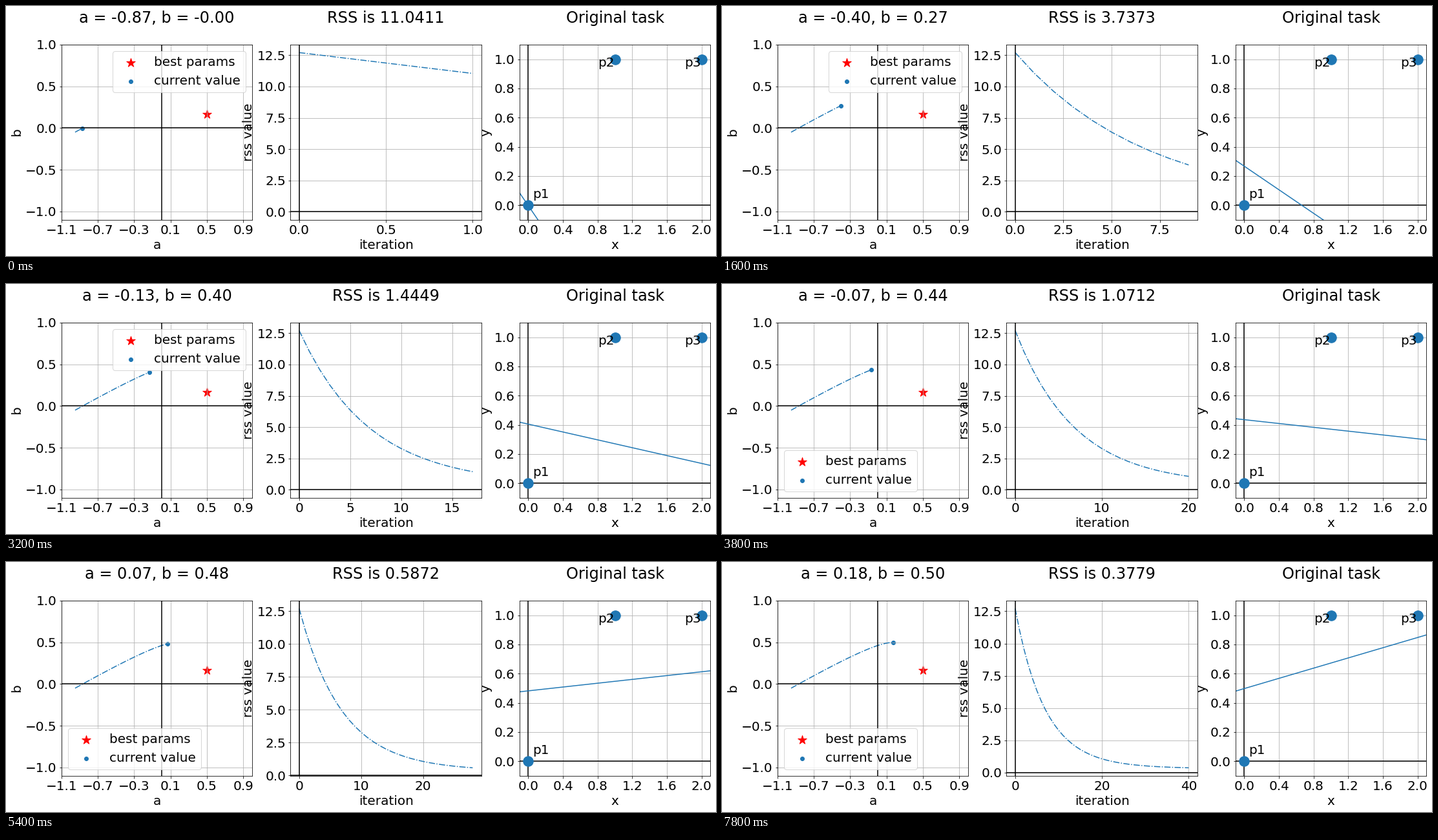
Write a matplotlib script that moves like this. It is 1099 px wide and 388 px high and loops after 8 s.

```python
import numpy as np
import matplotlib.pyplot as plt
from matplotlib.animation import FuncAnimation

W, H, DPI = 1099, 388, 72
STEPS, RATE = 40, 0.005
BLUE = "#1f77b4"

plt.rcParams["font.family"] = "DejaVu Sans"
plt.rcParams["font.size"] = 20

xs = np.array([0.0, 1.0, 2.0])
ys = np.array([0.0, 1.0, 1.0])


def rss(a, b):
    return np.sum((a * xs + b - ys) ** 2)


def descend(a, b, steps):
    """Gradient descent that updates a first, then b with the new a."""
    path = [(a, b)]
    for _ in range(steps):
        a -= RATE * 2 * np.sum((a * xs + b - ys) * xs)
        b -= RATE * 2 * np.sum(a * xs + b - ys)
        path.append((a, b))
    return np.array(path)


path = descend(-0.95, -0.05, STEPS)
losses = np.array([rss(a, b) for a, b in path])

fig = plt.figure(figsize=(W / DPI, H / DPI), dpi=DPI)


def add_axes(col):
    left, width, height = 85.88 + col * 354.494, 295.412, 271.8
    return fig.add_axes([left / W, 56.25 / H, width / W, height / H])


def zero_lines(ax):
    ax.axhline(0, color="black")
    ax.axvline(0, color="black")


def label(ax, x, y):
    ax.set_xlabel(x)
    ax.set_ylabel(y)
    ax.grid(True)


ax_par, ax_loss, ax_fit = (add_axes(i) for i in range(3))

# parameter plane
ax_par.scatter([0.5], [1 / 6], s=200, marker="*", color="red", label="best params")
dot = ax_par.scatter([0], [0], color=BLUE, label="current value")
trail, = ax_par.plot([], [], "-.", color=BLUE)
zero_lines(ax_par)
ax_par.set(xlim=(-1.1, 1), ylim=(-1.1, 1),
           xticks=np.arange(-1.1, 1, 0.4), yticks=np.arange(-1, 1.1, 0.5))
label(ax_par, "a", "b")
ax_par.legend(loc="best")

# points and fitted line
ax_fit.scatter(xs, ys, s=240, color=BLUE, zorder=2.5)
for name, x, y in (("p1", 0.05, 0.05), ("p2", 0.8, 0.95), ("p3", 1.8, 0.95)):
    ax_fit.text(x, y, name)
zero_lines(ax_fit)
ends = np.array([-0.1, 2.1])
fit, = ax_fit.plot([], [], color=BLUE)
ax_fit.set(xlim=ends, ylim=(-0.1, 1.1),
           xticks=np.arange(0, 2.1, 0.4), yticks=np.arange(0, 1.1, 0.2))
label(ax_fit, "x", "y")
ax_fit.set_title("Original task\n")


def update(i):
    n = i + 1
    a, b = path[n]
    trail.set_data(path[:n + 1, 0], path[:n + 1, 1])
    dot.set_offsets([(a, b)])
    ax_par.set_title(f"a = {a:.2f}, b = {b:.2f}\n")

    ax_loss.clear()
    ax_loss.plot(np.arange(n + 1), losses[:n + 1], "-.", color=BLUE)
    zero_lines(ax_loss)
    label(ax_loss, "iteration", "rss value")
    ax_loss.set_title(f"RSS is {losses[n]:.4f}\n")

    fit.set_data(ends, a * ends + b)


anim = FuncAnimation(fig, update, frames=STEPS, interval=200,
                     repeat=True, repeat_delay=0, blit=False)
plt.show()
```
